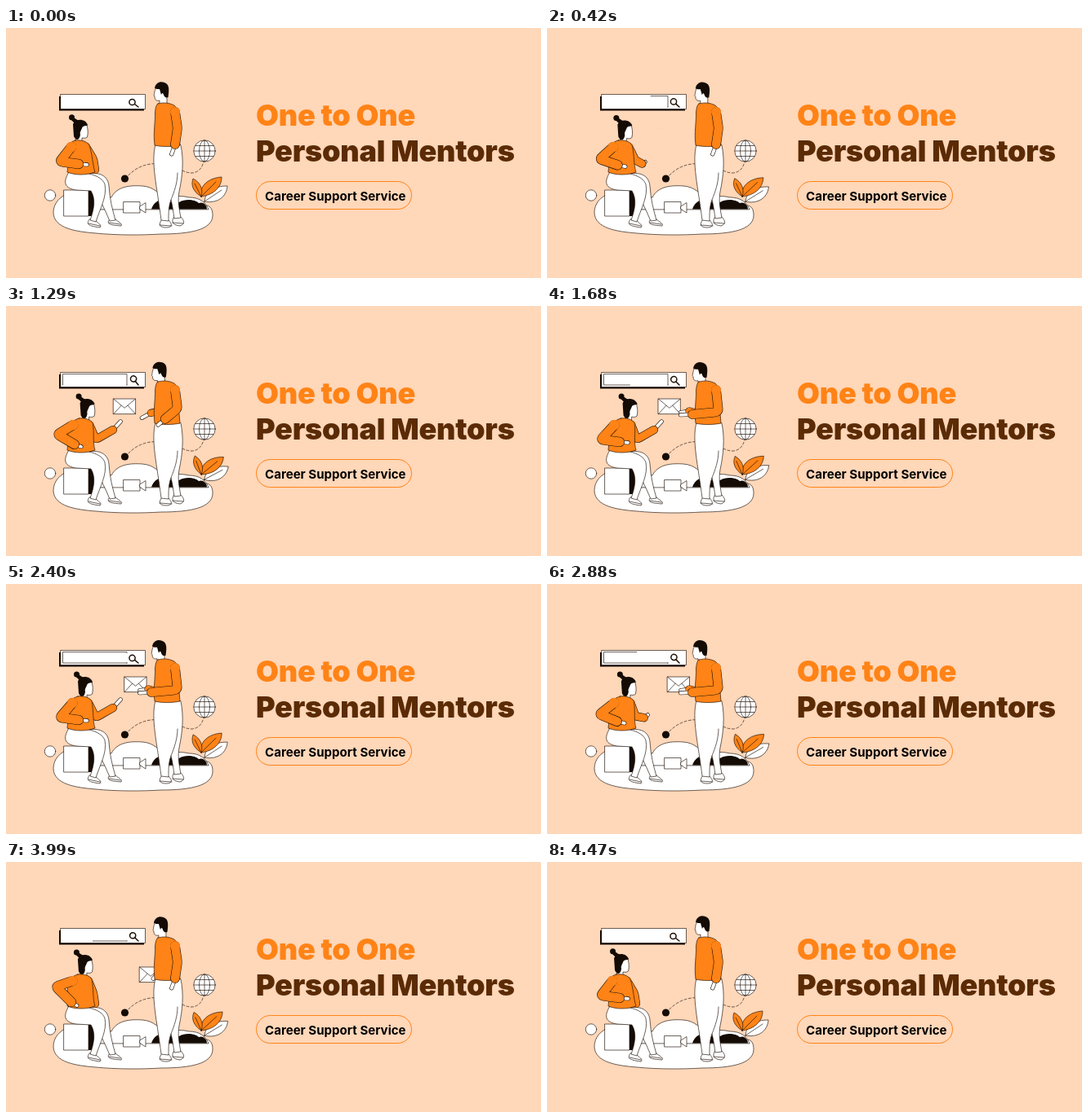
Write an HTML page that moves like this. It is 655 px wide and 307 px high and loops after 4.5 s.

```html
<!DOCTYPE html>
<html lang="en">
<head>
<meta charset="utf-8">
<title>Mentors banner</title>
<style>
  html, body { margin: 0; width: 100%; height: 100%; overflow: hidden; background: #ffd7b9; }
  svg { display: block; width: 655px; height: 307px; }
  text { font-family: Inter, sans-serif; font-weight: 900; font-size: 36px; letter-spacing: -.2px; }
  .tag { font-weight: 700; font-size: 15px; letter-spacing: .04px; }
  .w, .o, .l { stroke: #1c0f05; stroke-width: .65; stroke-linejoin: round; stroke-linecap: round; }
  .w { fill: #fff; }
  .o { fill: #ff8316; }
  .l { fill: none; }
  .k { fill: #140b04; }
  .limb { fill: none; stroke-linecap: round; stroke-linejoin: round; }
</style>
</head>
<body>
<svg viewBox="0 0 655 307">
  <text x="306" y="120" fill="#ff8316">One to One</text>
  <text x="306" y="164" fill="#5b2b05">Personal Mentors</text>
  <rect x="306.500" y="188.500" width="190" height="34" rx="17" fill="none" stroke="#ff8316"/>
  <text class="tag" x="317" y="212">Career Support Service</text>

  <!-- search bar -->
  <path class="k" d="M65 84H169V101.500H65Z"/>
  <rect class="w" x="67" y="81.500" width="103.500" height="18"/>
  <path id="trace" class="l" pathLength="1" d="M148 97V83.500H69.500V97Z"/>
  <g id="lens" class="l" style="stroke-width:1.500"><circle cx="154.500" cy="91" r="3.600"/><path d="M157.500 93.500L162 97"/></g>

  <!-- leaves, globe, dotted trail -->
  <g id="leaves">
    <path class="w" d="M243 213C244 200 255 194 271 194C270 208 258 216 243 213Z"/>
    <path class="l" d="M243 213L264 199"/>
    <path class="o" d="M239 207C236 194 248 184 264 183C264 196 254 205 239 207Z"/>
    <path class="l" d="M239 207L257 189"/>
    <path class="o" d="M239 207C229 201 226 193 229 185C237 189 242 197 239 207Z"/>
    <path class="l" d="M239 207L231 191"/>
  </g>
  <path class="l" stroke-dasharray="3 2.500" d="M146 185C158 171 172 165 190 167C211 168 214 178 228 178C236 177 240 172 242 164"/>
  <circle class="k" cx="145.500" cy="185" r="4.600"/>
  <circle class="w" cx="243" cy="151" r="13.200"/>
  <path class="l" d="M243 138V164M230 151H256M232 144.500H254M232 157.500H254"/>
  <ellipse class="l" cx="243" cy="151" rx="6.500" ry="13"/>
  <circle class="w" cx="54" cy="205.500" r="6.700"/>

  <!-- ground -->
  <path class="w" d="M112 207C90 194 58 203 58 227C59 246 85 250 110 252C135 254.500 165 254.500 190 253C225 253 253 248 253 230C253 222 250 219 246 218L112 222Z"/>
  <path class="w" d="M112 222.500C114 211 123 208 129 208C136 194 153 193 167 194C182 195 187 205 196 208C208 206 216 206 224 208C236 208 244 213 248 222.500Z"/>
  <path class="k" d="M178 222.500C181 213 190 208 199 213C204 214 206 212 212 214C220 209 232 211 236 215C241 213 246 217 246 222.500Z"/>
  <rect class="w" x="144" y="213.500" width="20" height="13.500"/>
  <path class="w" d="M164 219L171 214.500V227L164 222.500Z"/>
  <rect class="k" x="100" y="199" width="8" height="32"/>
  <rect class="w" x="71" y="199" width="30" height="32"/>

  <g id="mail">
    <rect class="w" x="-13.500" y="-9.300" width="27" height="18.600"/>
    <path class="l" d="M-13.500 -9.300L0 2L13.500 -9.300M-13.500 9.300L-4 -1M13.500 9.300L4 -1"/>
  </g>

  <!-- seated woman -->
  <path class="w" d="M126 236C123 241 128 242 141 243C143 240 137 238 134 235Z"/>
  <path class="w" d="M100 179C118 176 125 184 126 194C127 210 130 222 134 236L127 237C121 222 113 208 108 195Z"/>
  <path class="w" d="M102 235C98 241 100 243 115 245C118 242 113 240 110 237Z"/>
  <path class="l" d="M101 240L115 243M126 239L140 241"/>
  <path class="w" d="M77 177C69 190 72 197 86 199L104 200C110 210 108 222 103 236L110 238C115 222 124 207 121 192C117 180 95 176 77 177Z"/>
  <g id="farArmW"></g>
  <g id="headW">
    <path class="w" d="M93 119L99 119C100 124 101 128 99.500 134C97 136 95 135 93 135L93 142L84 142L87 128Z"/>
    <path class="k" d="M82 118C85 111 97 111 100 119C99 121 94 119 93 123C92 126 90 128 91 131C90 138 86 139 83 133Z"/>
    <path class="k" d="M85 118L79 112L83 110L89 114Z"/>
    <circle class="k" cx="80.500" cy="109.800" r="3.500"/>
  </g>
  <path id="bodyW" class="o"/>
  <g id="nearArmW"></g>

  <!-- standing man -->
  <g id="farArmM"></g>
  <path class="w" d="M205 233C202 239 205 242 213 243C219 241 219 237 214 232Z"/>
  <path class="w" d="M191 235C186 241 188 245 196 245C204 245 204 241 199 236Z"/>
  <path class="l" d="M188 242L203 243M204 239L217 240"/>
  <path class="w" d="M183 143C177 165 185 195 190 236L199 237C199 227 199 219 202 211C204 219 205 227 206 234L214 233C212 222 210 212 212 201C216 182 218 163 214 144Z"/>
  <path class="l" d="M202 211C206 201 210 190 210 178"/>
  <g id="headM">
    <path class="w" d="M184 73C181 78 182 81 181 83L182 84C182 88 184 90 188 89L188 98L197 98L197 80L190 72Z"/>
    <path class="k" d="M182 74C183 67 189 65 194 67C200 69 200 75 198.500 85C196 86 194 85 193 82C192 79 191 80 190 82L188 75C186 75 184 75 182 74Z"/>
  </g>
  <path class="o" d="M186 93C194 91 200 92 206 95C211 99 212 110 211 120L213 144C203 146 190 146 182 144C180 128 183 115 182.500 104C183 98 184 94 186 93Z"/>
  <g id="nearArmM"></g>
</svg>
<script>
const LOOP = 4500, INK = '#1c0f05', ORANGE = '#ff8316';
const $ = id => document.getElementById(id);
const move = (id, value) => $(id).setAttribute('transform', value);

const clamp = u => Math.max(0, Math.min(1, u));
const linear = (t, a, b) => clamp((t - a) / (b - a));
const ramp = (t, a, b) => { const u = linear(t, a, b); return u * u * (3 - 2 * u); };
const pulse = (t, a, b, c, d) => ramp(t, a, b) - ramp(t, c, d);
const blend = (p, q, u) => p.map((v, i) => v + (q[i] - v) * u);

// Arm poses: elbow, wrist, fingertips
const POSE = {
  womanDown: [107, 161, 109, 174, 110, 176],
  womanReach: [110, 164, 131, 152, 142, 140],
  lap: [66, 164, 89, 167, 101, 168],
  hip: [61, 153, 80, 172, 88, 177],
  manDown: [210, 123, 207, 143, 202, 157],
  manHold: [210, 130, 178, 133, 161, 134],
  farHidden: [190, 125, 192, 139, 191, 145],
  farOffer: [187, 126, 180, 133, 166, 144],
  farHold: [190, 133, 174, 129, 162, 131]
};

function makeArm(id, width) {
  const add = (color, w) => {
    const p = document.createElementNS('http://www.w3.org/2000/svg', 'path');
    p.setAttribute('class', 'limb');
    p.setAttribute('stroke', color);
    p.setAttribute('stroke-width', w);
    $(id).append(p);
    return p;
  };
  const hand = [add(INK, 5), add('#fff', 3.800)];
  const sleeve = [add(INK, width + 1.200), add(ORANGE, width)];
  const cover = add(ORANGE, width + 1.500);
  return (sx, sy, [ex, ey, wx, wy, hx, hy]) => {
    const dx = hx - wx, dy = hy - wy;
    hand.forEach(p => p.setAttribute('d', `M${wx} ${wy}L${hx - dx * .15} ${hy - dy * .15}`));
    // Bend softly around the elbow
    const [ax, ay] = blend([sx, sy], [ex, ey], .85), [bx, by] = blend([wx, wy], [ex, ey], .85);
    const d = `M${sx} ${sy}L${ax} ${ay}Q${ex} ${ey} ${bx} ${by}L${wx} ${wy}`;
    sleeve.forEach(p => p.setAttribute('d', d));
    cover.setAttribute('d', `M${sx} ${sy}l.01 0`);
  };
}
const farArmW = makeArm('farArmW', 9), nearArmW = makeArm('nearArmW', 11);
const farArmM = makeArm('farArmM', 8), nearArmM = makeArm('nearArmM', 10.500);

function drawProps(t) {
  const sway = (1 - Math.cos(t / LOOP * 4 * Math.PI)) / 2;
  move('lens', `rotate(${14 * sway} 162 97)`);
  move('leaves', `rotate(${6 * sway} 240 208)`);

  // The outline draws itself, then erases from its start
  const p = t / LOOP * 2, from = Math.max(0, p - 1), len = Math.min(1, p) - from;
  $('trace').setAttribute('stroke-dasharray', `0 ${from} ${len} 2`);
  $('trace').style.visibility = len > .015 ? 'visible' : 'hidden';

  const x = 140 + 21 * linear(t, 870, 2600) + 36 * ramp(t, 3550, LOOP);
  const y = 123.300 + 15 * ramp(t, 3400, 3990);
  move('mail', `translate(${x} ${y}) scale(${ramp(t, 350, 800)})`);
}

function drawWoman(t) {
  const up = pulse(t, 0, 850, 3950, LOOP);
  const lean = up * (6 + 2.300 * (1 - Math.cos((t - 870) / 1560 * 2 * Math.PI)));
  const k = lean / 2;
  move('headW', `translate(${lean} ${1.200 * up})`);
  $('bodyW').setAttribute('d', `M${85 + k} 138C${92 + k} 137 ${99 + k} 139 ${102 + k} 144`
    + `C${106 + k / 2} 156 106 168 109 177C98 181 85 181 75 177C76 168 76 160 ${73 + k / 2} 150`
    + `C${74 + k} 144 ${78 + k} 140 ${85 + k} 138Z`);

  const reach = pulse(t, 150, 850, 2450, 3250);
  const onHip = pulse(t, 200, 850, 1000, 1650) + pulse(t, 2600, 3300, 4000, 4450);
  farArmW(98 + k, 146, blend(POSE.womanDown, POSE.womanReach, reach));
  nearArmW(80 + k / 2, 146, blend(POSE.lap, POSE.hip, onHip));
}

function drawMan(t) {
  const bow = pulse(t, 200, 1600, 3300, 4450);
  const offer = pulse(t, 350, 870, 3500, 4450);
  const hold = pulse(t, 1000, 1650, 3400, 3950);
  move('headM', `translate(${-3 * bow} ${2.700 * bow})`);
  const gesture = blend(POSE.farOffer, POSE.farHold, hold);
  farArmM(189, 106, blend(POSE.farHidden, gesture, offer));
  nearArmM(207, 103, blend(POSE.manDown, POSE.manHold, hold));
}

const start = performance.now();
function tick() {
  const t = (performance.now() - start) % LOOP;
  drawProps(t);
  drawWoman(t);
  drawMan(t);
  requestAnimationFrame(tick);
}
tick();
</script>
</body>
</html>
```
